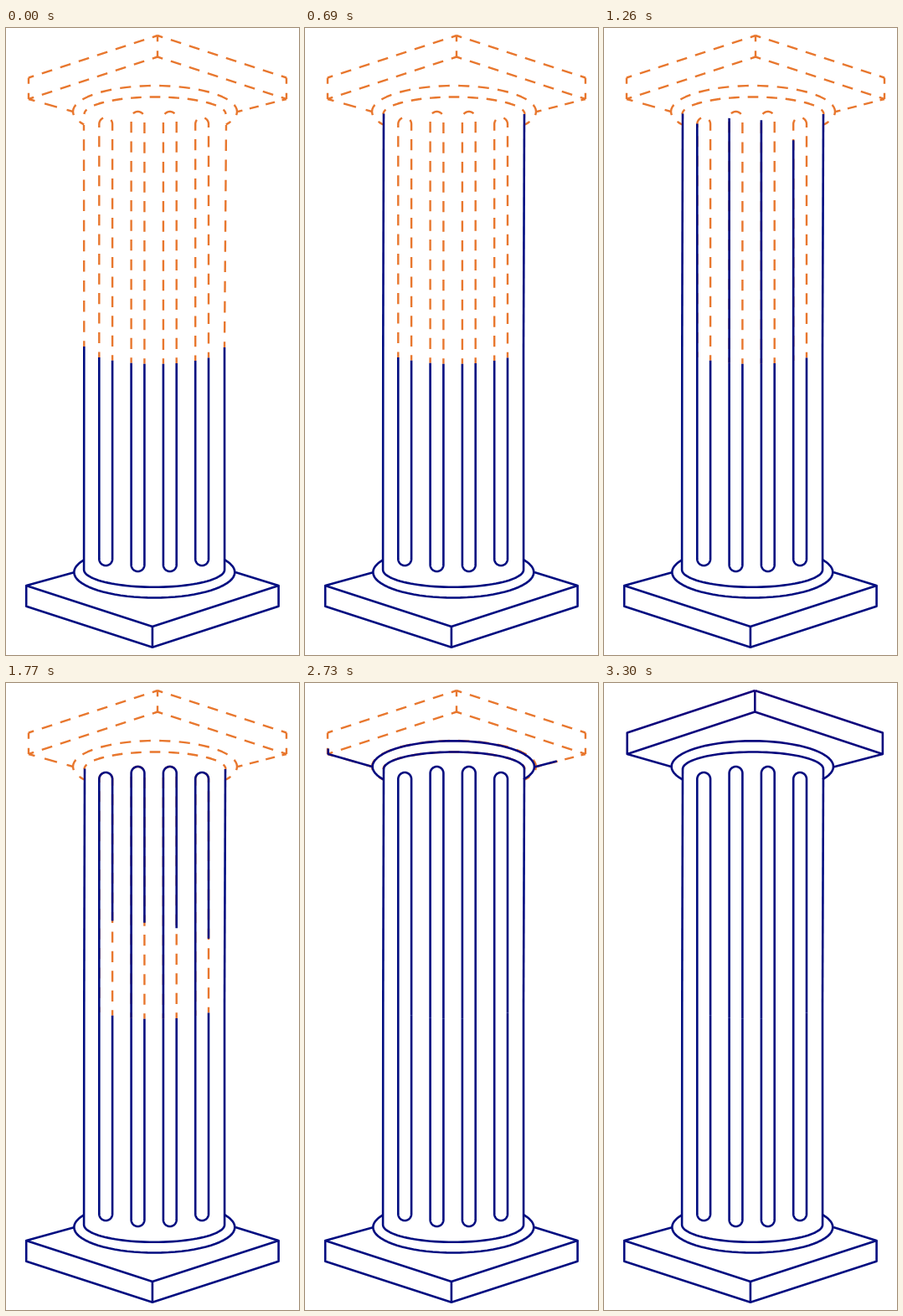
Write an HTML page with a canvas that moves like this. It is 350 by 750 pixels and loops after 8 s.

```html
<!DOCTYPE html>
<html lang="en">
<head>
<meta charset="utf-8">
<title>Column</title>
<style>
html, body { margin: 0; width: 100%; height: 100%; overflow: hidden; background: #fff; }
canvas { display: block; width: 350px; height: 750px; }
</style>
</head>
<body>
<canvas id="stage"></canvas>
<script>
const LOOP = 8000, STEP = 30, DONE = 3285;
const ORANGE = '#e8772e';
const AXIS = 177.3, RADIUS = 84;
const canvas = document.getElementById('stage');
const ctx = canvas.getContext('2d');
const scale = window.devicePixelRatio || 1;
canvas.width = 350 * scale;
canvas.height = 750 * scale;
ctx.scale(scale, scale);
ctx.lineJoin = 'round';

const navy = ctx.createLinearGradient(0, 0, 0, 750);
navy.addColorStop(0, '#14007a');
navy.addColorStop(0.17, '#000c80');

// Points on an ellipse; angles in degrees, clockwise from the right.
function arc(cx, cy, rx, ry, from, to) {
  return Array.from({ length: 49 }, (_, i) => {
    const a = (from + (to - from) * i / 48) * Math.PI / 180;
    return [cx + rx * Math.cos(a), cy + ry * Math.sin(a)];
  });
}

function pathLength(points) {
  return points.slice(1).reduce((sum, [x, y], i) =>
    sum + Math.hypot(x - points[i][0], y - points[i][1]), 0);
}

function draw(points, color, width, dash = [], offset = 0) {
  ctx.beginPath();
  points.forEach(([x, y]) => ctx.lineTo(x, y));
  ctx.strokeStyle = color;
  ctx.lineWidth = width;
  ctx.setLineDash(dash);
  ctx.lineDashOffset = offset;
  ctx.stroke();
}

const solid = points => draw(points, navy, 2.6);

// Fits a whole number of dashes, with half a dash at either end.
function dashed(points) {
  const length = pathLength(points);
  const period = length / Math.max(1, Math.round(length / 23.5));
  const dash = period * 0.56;
  draw(points, ORANGE, 2.4, [dash, period - dash], dash / 2);
}

// Corners of a square slab seen edge-on; "near" is its middle edge.
function slab(cx, half, sideY, nearY, height) {
  return {
    left: [cx - half, sideY], leftLow: [cx - half, sideY + height],
    near: [cx, nearY], nearLow: [cx, nearY + height],
    right: [cx + half, sideY], rightLow: [cx + half, sideY + height]
  };
}

// Where the finished lower half of the shaft ends: the front of a round section.
const cutY = x => 381 + 21 * Math.sqrt(Math.max(0, 1 - ((x - AXIS) / RADIUS) ** 2));

function makeFlute(i) {
  const r = 7.9, x = 119.2 + 38.3 * i;
  const inset = i % 3 ? 0 : 7;
  const top = 108 + inset, bottom = 642 - inset;
  const left = [x - r, cutY(x - r)], right = [x + r, cutY(x + r)];
  return {
    rise: [left, [x - r, top]],
    fall: [...arc(x, top, r, 8, 180, 360), right],
    base: [left, ...arc(x, bottom, r, 8, 180, 0), right],
    turn: 1240 + 10 * i * i,
    end: 2140 - 14 * i * i
  };
}

const flutes = [0, 1, 2, 3].map(makeFlute);
const foot = slab(174.9, 150.7, 667, 716, 24.7);
const roof = slab(180.3, 152.6, 59.5, 9, 25.5);
const plan = slab(181, 154, 59.5, 9, 25.5);
const shaftL = [AXIS - RADIUS, 381], shaftR = [AXIS + RADIUS - 0.3, 382];

const base = [
  [[82, 651], foot.left, foot.near, foot.right, [274, 651]],
  [foot.left, foot.leftLow, foot.nearLow, foot.rightLow, foot.right],
  [foot.near, foot.nearLow],
  arc(AXIS, 651, 96, 30.5, 209, -29),
  [shaftL, ...arc(AXIS - 0.2, 648, RADIUS, 20.8, 180, 0), shaftR],
  ...flutes.map(f => f.base)
];

// Each moving stroke: its points, start time and end time.
const strokes = [
  [[shaftL, [94, 102.5]], 225, 690],
  [[shaftR, [262, 103]], 225, 690],
  ...flutes.map(f => [f.rise, 890, f.turn]),
  ...flutes.map(f => [f.fall, f.turn, f.end]),
  [arc(178, 103, RADIUS, 20.5, 180, 360), 2190, 2580],
  [arc(AXIS, 100, 96.7, 30.7, 30, -210), 2210, 2700],
  [[[80, 100], roof.leftLow, roof.left, roof.near], 2500, 3200],
  [[[274, 100.5], roof.rightLow, roof.right, roof.near], 2580, 3300],
  [[roof.leftLow, roof.nearLow, roof.rightLow], 2750, 3300],
  [[roof.nearLow, roof.near], 2980, 3300]
];

const crownGuides = [
  arc(178, 103, 84.5, 20.5, 180, 360),
  arc(178, 100, 98, 31, 150, 390),
  [plan.left, plan.near], [plan.near, plan.right],
  [plan.leftLow, plan.nearLow], [plan.nearLow, plan.rightLow],
  [plan.left, plan.leftLow], [plan.near, plan.nearLow], [plan.right, plan.rightLow],
  [plan.leftLow, [80, 100]], [plan.rightLow, [277, 100]]
];
const shaftGuides = [[[93, 116], shaftL], [[263, 116], shaftR]];

function drawGuides(t) {
  if (t < 690) shaftGuides.forEach(dashed);
  for (const f of flutes) {
    if (t < f.end) dashed([...f.rise, ...f.fall]);
  }
  crownGuides.forEach(dashed);
}

function ease(t, start, end) {
  const x = Math.min(1, Math.max(0, (t - start) / (end - start)));
  return x * x * (3 - 2 * x);
}

function render(now) {
  const t = Math.floor((now % LOOP) / STEP) * STEP;
  ctx.fillStyle = '#fff';
  ctx.fillRect(0, 0, 350, 750);
  if (t < DONE) drawGuides(t);
  base.forEach(solid);
  for (const [points, start, end] of strokes) {
    const p = ease(t, start, end);
    if (p >= 1) solid(points);
    else if (p > 0) draw(points, navy, 2.6, [pathLength(points) * p, 2000]);
  }
}

const began = performance.now();
function frame() {
  render(performance.now() - began);
  requestAnimationFrame(frame);
}
frame();
</script>
</body>
</html>
```
